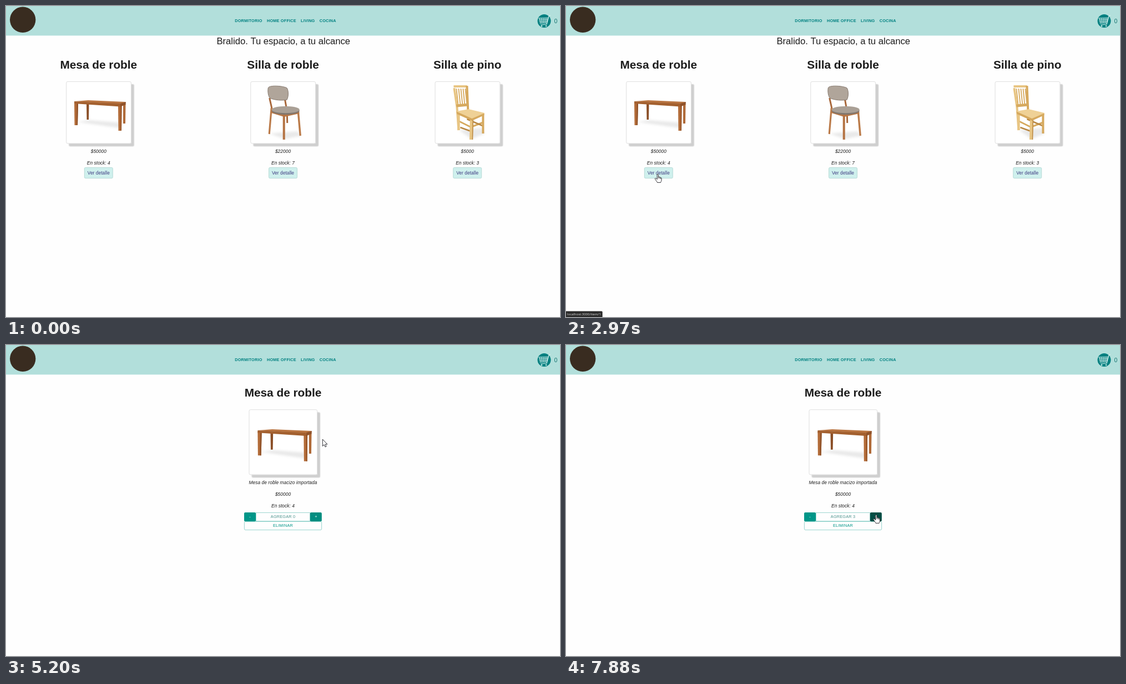
An HTML page with a canvas for the animation above (8000 ms loop, 998x561 px).

```html
<!DOCTYPE html>
<html lang="es">
<head>
<meta charset="utf-8">
<title>Tienda de muebles</title>
<style>
html, body { margin: 0; width: 100%; height: 100%; overflow: hidden; background: #fefefe; }
canvas { display: block; }
</style>
</head>
<body>
<canvas id="stage" width="998" height="561"></canvas>
<script>
const ctx = document.getElementById('stage').getContext('2d');
const LOOP = 8000, PAGE_AT = 3290, LOADED_AT = 5000;
const CLICKS = [6440, 6860, 7270];
const TEAL = '#009688', INK = '#1c1c1c';
const SANS = '"Liberation Sans", Arial, sans-serif';

const clamp = v => Math.min(1, Math.max(0, v));
const ramp = (t, from, to) => clamp((t - from) / (to - from));
const mix = (a, b, k) => `rgb(${a.map((v, i) => Math.round(v + (b[i] - v) * k))})`;

function text(str, x, y, { size = 8.32, style = '', color = INK, align = 'center', spacing = 0, family = SANS } = {}) {
  ctx.font = `${style} ${size}px ${family}`;
  ctx.letterSpacing = spacing + 'px';
  ctx.textAlign = align;
  ctx.fillStyle = color;
  ctx.fillText(str, x, y);
}
const italic = (str, x, y, color) => text(str, x, y, { style: 'italic', spacing: 0.078, color });
const title = (str, x, y) => text(str, x, y, { style: 'bold', size: 20.8 });
const label = (str, x, y, color) => text(str, x, y, { size: 7.28, spacing: 0.21, color });

function box(x, y, w, h, r, fill, stroke) {
  ctx.beginPath();
  ctx.roundRect(x, y, w, h, r);
  if (fill) { ctx.fillStyle = fill; ctx.fill(); }
  if (stroke) { ctx.strokeStyle = stroke; ctx.lineWidth = 0.8; ctx.stroke(); }
}
function poly(color, ...p) {
  ctx.fillStyle = color;
  ctx.beginPath();
  for (let i = 0; i < p.length; i += 2) ctx.lineTo(p[i], p[i + 1]);
  ctx.fill();
}
function line(color, width, ...p) {
  ctx.strokeStyle = color;
  ctx.lineWidth = width;
  ctx.beginPath();
  for (let i = 0; i < p.length; i += 2) ctx.lineTo(p[i], p[i + 1]);
  ctx.stroke();
}
function disc(color, x, y, rx, ry = rx) {
  ctx.fillStyle = color;
  ctx.beginPath();
  ctx.ellipse(x, y, rx, ry, 0, 0, Math.PI * 2);
  ctx.fill();
}
function at(x, y, scale, draw) {
  ctx.save();
  ctx.translate(x, y);
  ctx.scale(scale, scale);
  draw();
  ctx.restore();
}

function frame(x, y, w, h) {
  ctx.save();
  ctx.shadowColor = '#cfcfcf';
  ctx.shadowOffsetX = ctx.shadowOffsetY = 5;
  ctx.shadowBlur = 1.5;
  box(x, y, w, h, 2.5, '#fff');
  ctx.restore();
  box(x + 0.4, y + 0.4, w - 0.8, h - 0.8, 2.5, '#fff', '#d6d6d6');
}

// Furniture is drawn relative to the corner of its frame.
function floorShade(...p) {
  ctx.save();
  ctx.filter = 'blur(2px)';
  poly('#e9e9e9', ...p);
  ctx.restore();
}
function table() {
  floorShade(20, 73, 42, 70, 95, 74, 96, 84);
  poly('#8a4e26', 37, 40, 41.5, 40, 41, 69, 37.5, 69);
  poly('#b06a38', 103, 42, 107.5, 41, 107, 76, 103, 76);
  poly('#b26b38', 15, 38, 22, 38, 21, 79, 15.5, 79);
  poly('#8f5229', 19.5, 39, 22, 39, 21, 79, 19, 79);
  poly('#b26b38', 94, 42, 100.5, 42, 100, 89, 94.5, 89);
  poly('#915126', 98.5, 42, 100.5, 42, 100, 89, 98.5, 89);
  poly('#b97542', 15, 36, 40, 34, 108, 37, 98, 41);
  poly('#a3602f', 15, 36, 98, 40, 98, 45.5, 15, 40);
  poly('#8f5229', 98, 40, 108, 37, 107.5, 42, 98, 45.5);
}
function oakChair() {
  floorShade(35, 94, 84, 90, 92, 98, 62, 104);
  line('#a8683c', 3, 34.5, 30, 39, 50);
  line('#a8683c', 3, 62, 31, 65, 48);
  line('#bb7b4a', 3.2, 38, 48, 34, 95);
  line('#a8683c', 3, 66, 55, 66.5, 75);
  line('#bb7b4a', 3.4, 86, 53, 90, 98);
  poly('#b87745', 37, 52, 60, 58, 88, 54, 88, 58, 61, 64, 38, 57);
  line('#b47343', 4, 60.5, 58, 60.5, 105);
  disc('#81766d', 63.5, 53, 25, 7);
  disc('#aaa096', 63.5, 51, 25, 6.3);
  ctx.beginPath();
  ctx.moveTo(32, 12);
  ctx.bezierCurveTo(33, 6, 60, 8, 66, 12);
  ctx.bezierCurveTo(69, 17, 69, 27, 66, 33);
  ctx.bezierCurveTo(58, 35, 43, 34, 35, 30);
  ctx.bezierCurveTo(32, 26, 31, 18, 32, 12);
  ctx.fillStyle = '#b0a59a';
  ctx.fill();
  ctx.strokeStyle = '#877a70';
  ctx.lineWidth = 1;
  ctx.stroke();
}
function pineChair() {
  floorShade(44, 88, 84, 84, 90, 94, 66, 104);
  const pale = '#e8c583', mid = '#d6a95e', dark = '#b98742';
  for (let i = 0; i < 5; i++) line(mid, 1.8, 39 + i * 4, 13, 42 + i * 4, 42);
  line(pale, 4, 34, 9, 58, 9);
  line(pale, 4, 35, 12, 40, 46, 43, 88);
  line(mid, 4, 58, 8, 60, 54);
  line(mid, 5, 39, 44, 60, 42);
  line(mid, 3, 44, 72, 64, 82);
  line(dark, 2.5, 46, 83, 65, 90);
  line(mid, 3, 66, 82, 87, 74);
  line(dark, 2.5, 58, 68, 86, 80);
  line(pale, 4.5, 43, 56, 43, 88);
  line(mid, 4, 87, 58, 87, 94);
  line(pale, 6, 66.5, 65, 65.5, 105);
  line(dark, 1.5, 69, 66, 68, 105);
  poly(mid, 39, 54, 67, 66, 89, 57, 89, 61, 67, 71, 40, 59);
  poly('#efd196', 39, 54, 61, 50, 90, 57, 67, 67);
}

function cartIcon() {
  disc('#008080', 969.5, 27, 12);
  const pale = '#d8f1ee';
  for (let i = 0; i < 5; i++) line(pale, 0.9, 961 + i * 3.3, 21.5, 963 + i * 2.8, 31);
  for (let i = 0; i < 4; i++) line(pale, 0.9, 959 + i * 0.8, 22 + i * 3, 977 - i, 21.5 + i * 3);
  line(pale, 1.2, 981, 17, 978, 18, 974, 33, 963, 34);
  disc(pale, 965, 36.3, 1.2);
  disc(pale, 973, 36, 1.2);
}
function header() {
  ctx.fillStyle = '#b2dfdb';
  ctx.fillRect(0, 0, 998, 53.4);
  disc('#392c20', 30.2, 24.8, 23.2);
  [['DORMITORIO', 412.3], ['HOME OFFICE', 470], ['LIVING', 531], ['COCINA', 564.8]].forEach(([name, x]) =>
    text(name, x, 29.3, { size: 7.28, style: 'bold', spacing: 0.21, align: 'left', color: '#008080' }));
  cartIcon();
  text('0', 990.3, 30.6, { size: 10.4, color: '#16736f' });
}

const PRODUCTS = [
  ['Mesa de roble', 50000, 4, table],
  ['Silla de roble', 22000, 7, oakChair],
  ['Silla de pino', 5000, 3, pineChair]
];
function catalogue() {
  text('Bralido. Tu espacio, a tu alcance', 620, 68.7, { size: 16.64, align: 'right' });
  PRODUCTS.forEach(([name, price, stock, art], i) => {
    const x = 166.8 + i * 332.2;
    title(name, x, 112.8);
    frame(x - 58.6, 136, 117.6, 112.3);
    at(x - 58.8, 136, 1, art);
    italic('$' + price, x, 265.3);
    italic('En stock: ' + stock, x, 286.2);
    box(x - 25.5, 291.4, 51, 19.3, 2, '#cff0ed', '#abd3cf');
    text('Ver detalle', x, 304, { spacing: 0.078, color: '#3d3a80' });
  });
}

function plusColor(t) {
  const base = [0, 150, 136], hover = [0, 105, 95], pressed = [0, 77, 68];
  if (t < LOADED_AT) return mix(base, hover, ramp(t, 4660, 4790));
  if (t < 5900) return mix(hover, base, ramp(t, LOADED_AT, LOADED_AT + 250));
  if (t < CLICKS[0]) return mix(base, hover, ramp(t, 5960, 6210));
  return mix(hover, pressed, ramp(t, CLICKS[0], CLICKS[0] + 300));
}
function ripple(t, x, y, w, h) {
  const start = CLICKS.filter(c => c <= t).pop();
  if (start === undefined) return;
  const k = (t - start) / 520;
  if (k >= 1) return;
  ctx.save();
  ctx.beginPath();
  ctx.roundRect(x, y, w, h, 2);
  ctx.clip();
  disc(`rgba(255,255,255,${0.2 * (1 - k)})`, x + w / 2, y + h / 2, 3 + 14 * Math.sqrt(k));
  ctx.restore();
}
function controls(y, t, count) {
  const over = t < LOADED_AT ? ramp(t, 4540, 4650) * (1 - ramp(t, 4720, 4960)) : 0;
  const edge = `rgba(0,150,136,${0.5 + 0.5 * over})`;
  if (count !== null) {
    box(450.3, y + 0.4, 97.4, 15.4, 0, null, 'rgba(0,150,136,.5)');
    label('AGREGAR ' + count, 499, y + 10, '#4b938d');
  }
  box(429.4, y + 16.4, 139.2, 15.2, 2, `rgba(0,150,136,${0.05 * over})`, edge);
  label('ELIMINAR', 499, y + 26, TEAL);
  box(429, y, 21, 16.2, 2, TEAL);
  label('-', 439.5, y + 9.8, '#fff');
  box(547.8, y, 21, 16.2, 2, plusColor(t));
  label('+', 558.4, y + 9.8, '#fff');
  ripple(t, 547.8, y, 21, 16.2);
}
function loadingPage(t) {
  frame(496.2, 53.5, 6, 18);
  italic('$', 499, 89, '#23504c');
  italic('En stock:', 499, 109.9, '#23403e');
  controls(119, t, null);
}
function detailPage(t) {
  title('Mesa de roble', 499, 93);
  frame(437.6, 116.3, 123.4, 118);
  at(437.6, 116.2, 1.05, table);
  italic('Mesa de roble macizo importada', 499, 251.2);
  italic('$50000', 499, 272);
  italic('En stock: 4', 499, 292.9);
  controls(302, t, CLICKS.filter(c => c <= t).length);
}

function statusBar(t) {
  const alpha = ramp(t, 2830, 2970) * (1 - ramp(t, PAGE_AT, 3490));
  if (!alpha) return;
  ctx.save();
  ctx.globalAlpha = alpha;
  box(-1, 550.6, 66.7, 12, 1.5, '#2b2b2b');
  text('localhost:3000/item/1', 2, 558.4, { size: 6, align: 'left', color: '#ddd', family: '"Open Sans", sans-serif' });
  ctx.restore();
}

// time, x, y of the pointer's hot spot
const PATH = [
  [120, 41, 326], [260, 315, 343], [380, 315, 343], [870, 485, 161], [1070, 485, 161],
  [1350, 494, 118], [1890, 398, 181.5], [2700, 165, 303], [3810, 165, 303],
  [4650, 564, 140], [4720, 564, 134], [4790, 563.5, 131], [LOADED_AT, 564, 130],
  [5470, 579, 231], [6020, 557.5, 303], [6170, 558.5, 306]
];
function pointer(t) {
  const i = PATH.findIndex(p => p[0] > t);
  if (i < 0) return PATH[PATH.length - 1].slice(1);
  const [t0, x0, y0] = PATH[i - 1], [t1, x1, y1] = PATH[i];
  const k = (t - t0) / (t1 - t0), e = t1 - t0 > 250 ? k * k * (3 - 2 * k) : k;
  return [x0 + (x1 - x0) * e, y0 + (y1 - y0) * e];
}
function overButton(t, x, y) {
  const inside = (l, top, r, b) => x >= l && x <= r && y >= top && y <= b;
  if (t < PAGE_AT) return inside(141, 291, 193, 311);
  if (t < LOADED_AT) return inside(429, 119, 569, 151);
  return inside(429, 302, 569, 334);
}
const ARROW = new Path2D('M.4.4V12.8L3.2 10.2 5.2 14.3 7.2 13.4 5.3 9.4H9Z');
const HAND = new Path2D('M-.8 1.2C-.8-.2 1.4-.2 1.4 1.2V5.4C2 4.7 3.5 5 3.6 6 4.3 5.4 5.4 5.8 5.5 6.8 6.2 6.3 7 6.8 7 7.8V11C7 13 5.8 14 5.6 15.4H-.6C-.8 13.8-2.6 12.6-3.4 10.8L-4.6 8.8C-5 7.6-3.5 7-2.6 8L-.8 9.8Z');
const KNUCKLES = new Path2D('M1.4 5.4V8M3.6 6V8.4M5.5 6.8V8.8');
function cursor(t) {
  if (t < 120) return;
  const [x, y] = pointer(t), hand = overButton(t, x, y);
  ctx.save();
  ctx.translate(x, y);
  ctx.lineWidth = 0.9;
  ctx.lineJoin = 'round';
  ctx.fillStyle = '#fff';
  ctx.strokeStyle = '#1b1b22';
  ctx.fill(hand ? HAND : ARROW);
  ctx.stroke(hand ? HAND : ARROW);
  if (hand) ctx.stroke(KNUCKLES);
  ctx.restore();
}

function draw(now) {
  const t = now % LOOP;
  ctx.fillStyle = '#fefefe';
  ctx.fillRect(0, 0, 998, 561);
  if (t < PAGE_AT) catalogue();
  else if (t < LOADED_AT) loadingPage(t);
  else detailPage(t);
  header();
  statusBar(t);
  cursor(t);
}
const began = performance.now();
function tick() {
  draw(performance.now() - began);
  requestAnimationFrame(tick);
}
tick();
</script>
</body>
</html>
```
